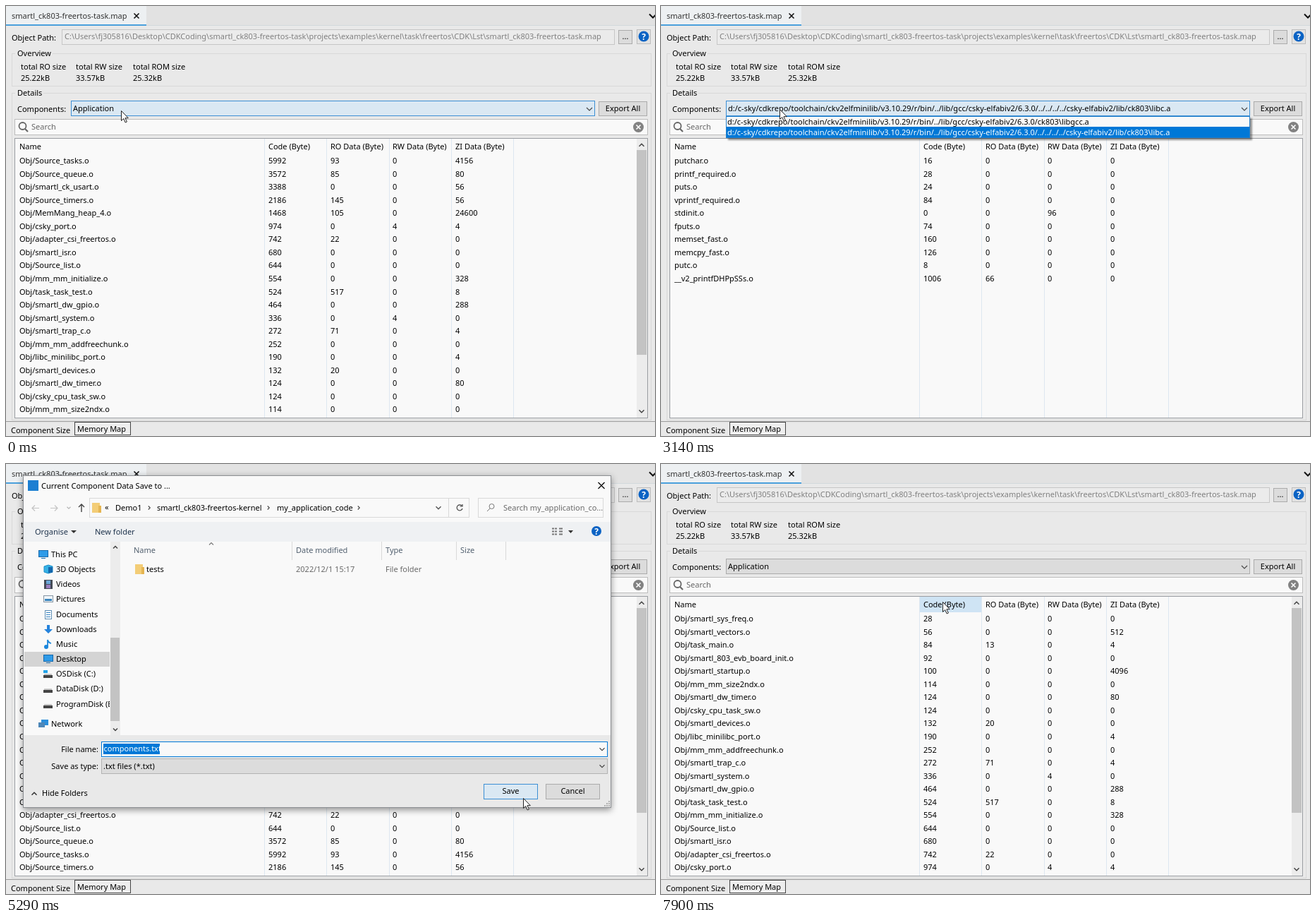
Animation, 920 px wide and 609 px high, one loop 8 s. Source, as an HTML page:

```html
<!DOCTYPE html>
<html lang="en">
<head>
<meta charset="utf-8">
<title>Memory map viewer</title>
<style>
  html, body { margin: 0; width: 100%; height: 100%; overflow: hidden; background: #e9e9e9; }
  svg { display: block; width: 100vw; height: 100vh; font: 11px "Noto Sans", "Open Sans", sans-serif; }
  .dropdown { filter: drop-shadow(3px 3px 1px rgba(0,0,0,.4)); }
  .dialog { filter: drop-shadow(0 3px 5px rgba(0,0,0,.42)); }
</style>
</head>
<body>
<svg id="stage" viewBox="0 0 920 609"></svg>
<script>
const DURATION = 8000;
const INK = '#000', PANEL = '#e9e9e9', PAPER = '#f9f9f9', BLUE = '#0078d7';
const stage = document.getElementById('stage');

// ---------- data: name, code, RO, RW, ZI (blank means 0) ----------
const parse = (text, prefix) => text.trim().split('\n').map(line => {
  const [name, ...values] = line.split(',');
  return [prefix + name + '.o', ...[0, 1, 2, 3].map(i => +(values[i] || 0))];
});
const appRows = parse(`
smartl_803_evb_board_init,92
smartl_ck_usart,3388,,,56
smartl_devices,132,20
smartl_dw_gpio,464,,,288
smartl_dw_timer,124,,,80
smartl_isr,680
smartl_startup,100,,,4096
smartl_sys_freq,28
smartl_system,336,,4
smartl_trap_c,272,71,,4
smartl_vectors,56,,,512
libc_minilibc_port,190,,,4
mm_mm_addfreechunk,252
mm_mm_initialize,554,,,328
mm_mm_size2ndx,114
adapter_csi_freertos,742,22
Source_list,644
Source_queue,3572,85,,80
Source_tasks,5992,93,,4156
Source_timers,2186,145,,56
MemMang_heap_4,1468,105,,24600
csky_port,974,,4,4
csky_cpu_task_sw,124
task_main,84,13,,4
task_task_test,524,517,,8`, 'Obj/');
const libcRows = parse(`
putchar,16
printf_required,28
puts,24
vprintf_required,84
stdinit,,,96
fputs,74
memset_fast,160
memcpy_fast,126
putc,8
__v2_printfDHPpSSs,1006,66`, '');
const descending = [...appRows].sort((a, b) => b[1] - a[1]);
const ascending = [...appRows].sort((a, b) => a[1] - b[1]);

const toolchain = 'd:/c-sky/cdkrepo/toolchain/ckv2elfminilib/v3.10.29/r/bin/../lib/gcc/csky-elfabiv2/6.3.0/';
const components = [
  'Application',
  toolchain + String.raw`ck803\libgcc.a`,
  toolchain + String.raw`../../../../csky-elfabiv2/lib/ck803\libc.a`
];
const objectPath = String.raw`C:\Users\fj305816\Desktop\CDKCoding\smartl_ck803-freertos-task\projects\examples\kernel\task\freertos\CDK\Lst\smartl_ck803-freertos-task.map`;

// ---------- timeline ----------
// The screen refreshes in bursts: start, end, number of steps.
const bursts = [
  [100, 410, 4], [610, 810, 3], [1210, 1430, 3], [2140, 2940, 9], [3040, 3540, 6], [3740, 4460, 8],
  [4560, 5290, 8], [5390, 6190, 9], [6290, 6490, 3], [6640, 6700, 2], [6910, 7710, 9], [7900, 7900, 1]
];
const pointerPath = [
  [0, 163, 148], [410, 163, 148], [610, 163, 155], [810, 163, 176], [1210, 163, 180], [1430, 159, 191],
  [2340, 159, 191], [2940, 168, 146], [3240, 168, 146], [3540, 178, 161], [3740, 195, 161],
  [3842, 275, 164], [4460, 868, 150], [4760, 868, 150], [5290, 733, 473], [5790, 733, 473],
  [6190, 752, 467], [6290, 520, 395], [6390, 220, 322], [6490, 222, 262], [6640, 240, 243],
  [6700, 262, 222], [6910, 300, 212], [7210, 398, 196], [7710, 398, 192], [7900, 399, 195]
];
const tracks = {
  rows: [[0, descending], [2240, libcRows], [3740, appRows], [7310, ascending]],
  selected: [[0, 0], [2140, 2], [3740, 0]],
  combo: [[0, 'hover'], [200, 'press'], [2340, 'plain'], [2740, 'hover'], [3240, 'press'], [4040, 'plain']],
  slide: [[0, null], [100, 16], [200, 0], [2140, null], [3140, 16], [3240, 0], [3740, null]],
  marked: [[0, 0], [710, 1], [1320, 2], [3440, 0]],
  exportBtn: [[0, 'plain'], [4360, 'hover'], [4560, 'press'], [4650, 'plain'], [5590, 'focus'], [7000, 'plain']],
  dialog: [[0, false], [4650, true], [5590, false]],
  saveBtn: [[0, 'default'], [5180, 'hover'], [5390, 'press']],
  hoverRow: [[0, -1], [6290, 10], [6390, 7], [6490, 3], [6640, 2], [6700, 0], [7000, -1]],
  hoverHeader: [[0, false], [7110, true]]
};

function snap(t) {
  const burst = bursts.filter(b => b[0] <= t).pop();
  if (!burst) return 0;
  const [start, end, count] = burst;
  const step = (end - start) / (count - 1) || 1;
  return start + step * Math.min(count - 1, Math.floor((t - start) / step + 1e-6));
}
const valueAt = (track, t) => track.filter(key => key[0] <= t + 1e-6).pop()[1];
function pointerAt(t) {
  const next = pointerPath.findIndex(key => key[0] > t);
  if (next < 0) return pointerPath.at(-1).slice(1);
  const [t0, x0, y0] = pointerPath[next - 1], [t1, x1, y1] = pointerPath[next];
  const k = (t - t0) / (t1 - t0);
  return [Math.round(x0 + (x1 - x0) * k), Math.round(y0 + (y1 - y0) * k)];
}

// ---------- drawing helpers ----------
const fill = (x1, y1, x2, y2, color) =>
  `<rect x="${x1}" y="${y1}" width="${x2 - x1}" height="${y2 - y1}" fill="${color}"/>`;
const box = (x1, y1, x2, y2, color, border, weight = 1) =>
  `<rect x="${x1 + weight / 2}" y="${y1 + weight / 2}" width="${x2 - x1 - weight}" height="${y2 - y1 - weight}" fill="${color}" stroke="${border}" stroke-width="${weight}"/>`;
const path = (d, color = INK, weight = 1, inside = 'none') =>
  `<path d="${d}" fill="${inside}" stroke="${color}" stroke-width="${weight}"/>`;
const text = (x, middle, content, color = INK, anchor = 'start') =>
  `<text x="${x}" y="${Math.round(middle + 4)}" fill="${color}" text-anchor="${anchor}">${content}</text>`;
const disc = (x, y, r, color) => `<circle cx="${x}" cy="${y}" r="${r}" fill="${color}"/>`;
const chevron = (x, y, direction, size = 4, color = '#444', weight = 1.1) => {
  const turn = { down: 0, left: 90, up: 180, right: 270 }[direction];
  return `<path transform="translate(${x} ${y}) rotate(${turn})" d="M${-size} ${-size / 2}L0 ${size / 2}L${size} ${-size / 2}" fill="none" stroke="${color}" stroke-width="${weight}"/>`;
};
const helpIcon = (x, y, r) => disc(x, y, r, '#0b63c4') +
  `<text x="${x}" y="${y + 4.5}" fill="#fff" font-weight="700" font-size="12" text-anchor="middle">?</text>`;
const folder = (x, y) => fill(x, y, x + 11, y + 14, '#f3cd77') + fill(x + 9, y + 4, x + 13, y + 14, '#e5b552');

const skins = {
  plain: ['#dcdcdc', '#ababab'], hover: ['#dae8f3', '#3c8fd4'], press: ['#bfd9ee', '#2b6fb3'],
  focus: ['#dcdcdc', BLUE, 2], default: ['#dcdcdc', BLUE]
};
const button = (x1, y1, x2, y2, label, skin) =>
  box(x1, y1, x2, y2, ...skins[skin]) + text((x1 + x2) / 2, Math.floor((y1 + y2 - 1) / 2), label, INK, 'middle');

// ---------- main window ----------
const group = (y1, y2, label, width) =>
  box(8, y1, 915, y2, 'none', '#d8d8d8') + fill(13, y1 - 2, 13 + width, y1 + 3, PANEL) + text(16, y1, label);

function windowFrame() {
  return fill(0, 0, 920, 609, PANEL) + fill(0, 0, 920, 28, '#e2e2e2') +
    fill(0, 0, 199, 28, '#edf0f2') + fill(0, 27, 920, 28, '#d2d8dc') + fill(0, 26, 199, 28, '#4ba0dc') +
    text(8, 14, 'smartl_ck803-freertos-task.map', '#333') +
    path('M181.500 10.500l7 7m0-7l-7 7', '#111', 1.6) + chevron(917, 14, 'down', 5, '#111', 2) +
    text(8, 45, 'Object Path:') + box(79, 33, 863, 55, '#ebebeb', '#c6c6c6') + text(83, 43, objectPath, '#808080') +
    button(868, 34, 888, 54, '...', 'plain') + box(894, 33, 914, 54, '#e2e2e2', '#bdbdbd') + helpIcon(904, 43, 7.5) +
    group(67, 114, 'Overview', 53) +
    ['total RO size', 'total RW size', 'total ROM size'].map((label, i) =>
      text([21, 99, 180][i], 86, label) + text([21, 99, 180][i], 102, ['25.22kB', '33.57kB', '25.32kB'][i])).join('') +
    group(123, 587, 'Details', 40) + text(16, 146, 'Components:') +
    box(12, 160, 910, 183, PAPER, '#bdbdbd') +
    `<circle cx="23.500" cy="170" r="5" fill="none" stroke="#666" stroke-width="1.800"/>` + path('M27 174l4 4', '#666', 2.2) +
    text(36, 171, 'Search', '#666') + disc(896.5, 171.5, 7.5, '#828282') + path('M893.500 168.500l6 6m0-6l-6 6', '#fff', 1.6) +
    fill(0, 588, 920, 589, '#9a9a9a') + text(7, 601, 'Component Size') +
    box(97, 589, 177, 608, '#eeeeee', '#444') + text(101, 599, 'Memory Map');
}

function table(state) {
  const columns = [19, 372, 460, 548, 637], pitch = 18.55;
  const headers = ['Name', 'Code (Byte)', 'RO Data (Byte)', 'RW Data (Byte)', 'ZI Data (Byte)'];
  let out = box(12, 187, 910, 584, PAPER, '#9a9da2');
  if (state.hoverHeader) out += fill(367, 188, 455, 210, '#cfe4f4');
  if (state.hoverRow >= 0) {
    const top = Math.round(210 + state.hoverRow * pitch);
    out += fill(14, top, 720, top + 18.5, '#dbe9f4');
  }
  for (const x of [366, 454, 543, 631, 719]) out += fill(x, 188, x + 1, 583, '#dde7f0');
  headers.forEach((label, i) => out += text(columns[i], 199, label));
  state.rows.slice(0, 20).forEach((row, r) =>
    row.forEach((cell, i) => out += text(columns[i], 219 + r * pitch, cell)));
  if (state.rows.length > 20)
    out += fill(894, 188, 909, 583, '#ececec') + fill(894, 204, 908, 494, '#c3c3c3') +
      chevron(901, 197, 'up', 3.5, '#444', 1.5) + chevron(901, 574, 'down', 3.5, '#444', 1.5);
  return out;
}

function dropdown(state) {
  if (state.slide === null) return '';
  let out = box(92, 156, 835, 203 - state.slide, PAPER, '#2380cc');
  components.forEach((label, i) => {
    const top = 157 + i * 15 - state.slide, active = i === state.marked;
    if (top < 150) return;
    if (active) out += fill(93, Math.max(157, top), 834, top + 15, BLUE);
    out += text(94, top + 8, label, active ? '#fff' : INK);
  });
  return `<g class="dropdown">${out}</g>`;
}

// ---------- save dialog ----------
function placeIcon(kind, x, y) {
  const drive = fill(x, y + 2, x + 13, y + 6, '#444') + fill(x + 1, y, x + 12, y + 2, '#c9c9c9');
  return {
    screen: box(x, y - 6, x + 14, y + 4, '#2f9be8', '#1769ab') + fill(x + 4, y + 5, x + 10, y + 6, '#1769ab'),
    cube: path(`M${x + 1} ${y - 4}l6-2 6 2v8l-6 2-6-2z`, '#1d8fc9', 1, '#35b1e5') + fill(x + 7, y - 3, x + 13, y + 5, '#1467ad'),
    film: fill(x + 1, y - 6, x + 13, y + 7, '#444b57') + fill(x + 4, y - 5, x + 10, y, '#6aa7d8') + fill(x + 4, y + 1, x + 10, y + 6, '#9a7fc0'),
    picture: box(x, y - 5, x + 14, y + 5, '#eef5fa', '#8795a3') + fill(x + 2, y, x + 12, y + 3, '#3a85bd'),
    page: box(x + 2, y - 6, x + 12, y + 7, '#fff', '#5f8fb5') + path(`M${x + 4} ${y - 2.5}h6m-6 3h6m-6 3h6`, '#2e7fc0'),
    arrow: path(`M${x + 5} ${y - 6}h4v6h4l-6 6-6-6h4z`, 'none', 0, '#2583dc'),
    note: path(`M${x + 6} ${y + 4}v-10q1 4 5 5`, '#1b86dc', 1.8) + disc(x + 4, y + 4, 3, '#1b86dc'),
    system: drive + fill(x, y - 5, x + 6, y - 1, '#23a3e8'),
    drive,
    network: fill(x + 4, y - 6, x + 14, y + 2, '#2b8edb') + fill(x, y - 2, x + 9, y + 5, '#4e87b8')
  }[kind];
}

function dialog(state) {
  const gray = '#6a6a6a', line = '#d9d9d9', heading = '#52606f';
  const places = [
    ['screen', 'This PC'], ['cube', '3D Objects'], ['film', 'Videos'], ['picture', 'Pictures'], ['page', 'Documents'],
    ['arrow', 'Downloads'], ['note', 'Music'], ['screen', 'Desktop'], ['system', 'OSDisk (C:)'],
    ['drive', 'DataDisk (D:)'], ['drive', 'ProgramDisk (E:)'], ['network', 'Network']
  ];
  let tree = fill(26, 266, 147, 287, '#d4d4d4');
  places.forEach(([icon, label], i) => {
    const root = i === 0 || i === 11, y = i === 11 ? 368 : Math.round(128 + i * 21.15);
    tree += placeIcon(icon, root ? 46 : 53, y) + text(root ? 64 : 71, y, label);
  });

  let out = box(24, 16, 858, 487, PAPER, '#8c8f93') +
    fill(31, 23, 46, 38, '#1c7fd2') + text(50, 31, 'Current Component Data Save to ...') +
    path('M839.500 26l9 9m0-9l-9 9', INK, 1.2);

  // navigation bar
  out += path('M47 62.500h-10m4-4l-4 4 4 4M63 62.500h10m-4-4l4 4-4 4', '#c4c4c4', 1.2) + chevron(89, 62, 'down', 2.5, '#b5b5b5') +
    path('M107 68v-11m-4 4l4-4 4 4', '#444', 1.4) +
    box(118, 48, 657, 76, PAPER, line) + fill(627, 49, 628, 75, line) + folder(122, 55) +
    text(140, 61, '«') + text(155, 62, 'Demo1') + text(214, 62, 'smartl_ck803-freertos-kernel') + text(384, 62, 'my_application_code') +
    [203, 372, 500].map(x => chevron(x, 62, 'right', 2.5)).join('') + chevron(613, 62, 'down', 3.5, '#555', 1.4) +
    path('M646 59a4 4 0 1 0 1 4M647 57v3h-3.500', '#444', 1.2) +
    box(669, 48, 847, 76, PAPER, line) + `<circle cx="688.500" cy="60" r="3.500" fill="none" stroke="#777"/>` +
    path('M686 63l-4 4', '#777') + text(705, 62, 'Search my_application_co...', gray);

  // toolbar
  out += fill(25, 82, 857, 110, '#eff1f3') + text(41, 96, 'Organise', '#1f344d') + text(126, 96, 'New folder', '#1f344d') +
    path('M92 94h8l-4 4zM797 94h7l-3.500 4z', 'none', 0, '#333') +
    [91, 95, 99].map(y => path(`M774 ${y + .5}h3m1 0h3m3 0h5`, '#777', 2)).join('') + helpIcon(837, 95, 7);

  // places and file list
  out += `<svg x="0" y="0" width="147" height="385">${tree}</svg>` +
    fill(148, 110, 162, 384, '#ececec') + fill(148, 246, 161, 364, '#c3c3c3') +
    chevron(155, 118, 'up', 3, '#444', 1.5) + chevron(155, 376, 'down', 3, '#444', 1.5) +
    [405, 532, 638, 708].map(x => fill(x, 110, x + 1, 136, line)).join('') + chevron(291, 113, 'up', 3, '#777') +
    text(181, 122, 'Name', heading) + text(411, 122, 'Date modified', heading) + text(538, 122, 'Type', heading) + text(644, 122, 'Size', heading) +
    folder(183, 142) + text(199, 149, 'tests') + text(411, 149, '2022/12/1 15:17', gray) + text(538, 149, 'File folder', gray);

  // name, type and buttons
  out += fill(25, 384, 857, 486, PANEL) +
    text(131, 404, 'File name:', INK, 'end') + box(135, 393, 853, 415, PAPER, BLUE) +
    fill(138, 396, 218, 411, BLUE) + text(138.5, 403, 'components.txt', '#fff') + chevron(845, 404, 'down', 3.5) +
    text(131, 428, 'Save as type:', INK, 'end') + box(135, 417, 853, 439, '#dcdcdc', '#b2b2b2') +
    text(138, 428, '.txt files (*.txt)') + chevron(845, 428, 'down', 3.5) +
    chevron(40, 467, 'up', 3.5, '#333', 1.5) + text(51, 466, 'Hide Folders') +
    button(677, 453, 754, 475, 'Save', state.saveBtn) + button(765, 453, 842, 475, 'Cancel', 'plain') +
    [[855, 477], [855, 480], [855, 483], [852, 480], [852, 483], [849, 483]].map(([x, y]) => fill(x - 1, y, x + 1, y + 2, '#b0b0b0')).join('');
  return `<g class="dialog">${out}</g>`;
}

function pointer([x, y], state) {
  const overSearch = y > 161 && y < 182 && state.slide === null && !state.dialog;
  const shape = overSearch
    ? path('M-3.500-7.500h2.500l1 1 1-1h2.500M0-6.500v13M-3.500 7.500h2.500l1-1 1 1h2.500', '#222', 1.2)
    : path('M.500.500v14l3.200-3 2.500 5.500 2.200-1-2.500-5.300h4.400z', '#222', 1, '#fff');
  return `<g transform="translate(${x} ${y})">${shape}</g>`;
}

// ---------- playback ----------
function draw(t) {
  const state = {};
  for (const name in tracks) state[name] = valueAt(tracks[name], t);
  stage.innerHTML = windowFrame() +
    box(92, 134, 835, 156, ...skins[state.combo]) + text(95, 145, components[state.selected]) + chevron(827, 146, 'down') +
    button(840, 135, 909, 156, 'Export All', state.exportBtn) +
    table(state) + dropdown(state) + (state.dialog ? dialog(state) : '') + pointer(pointerAt(t), state);
}

const begin = performance.now();
let shown = -1;
function tick() {
  const t = snap((performance.now() - begin) % DURATION);
  if (t !== shown) draw(shown = t);
  requestAnimationFrame(tick);
}
tick();
</script>
</body>
</html>
```
